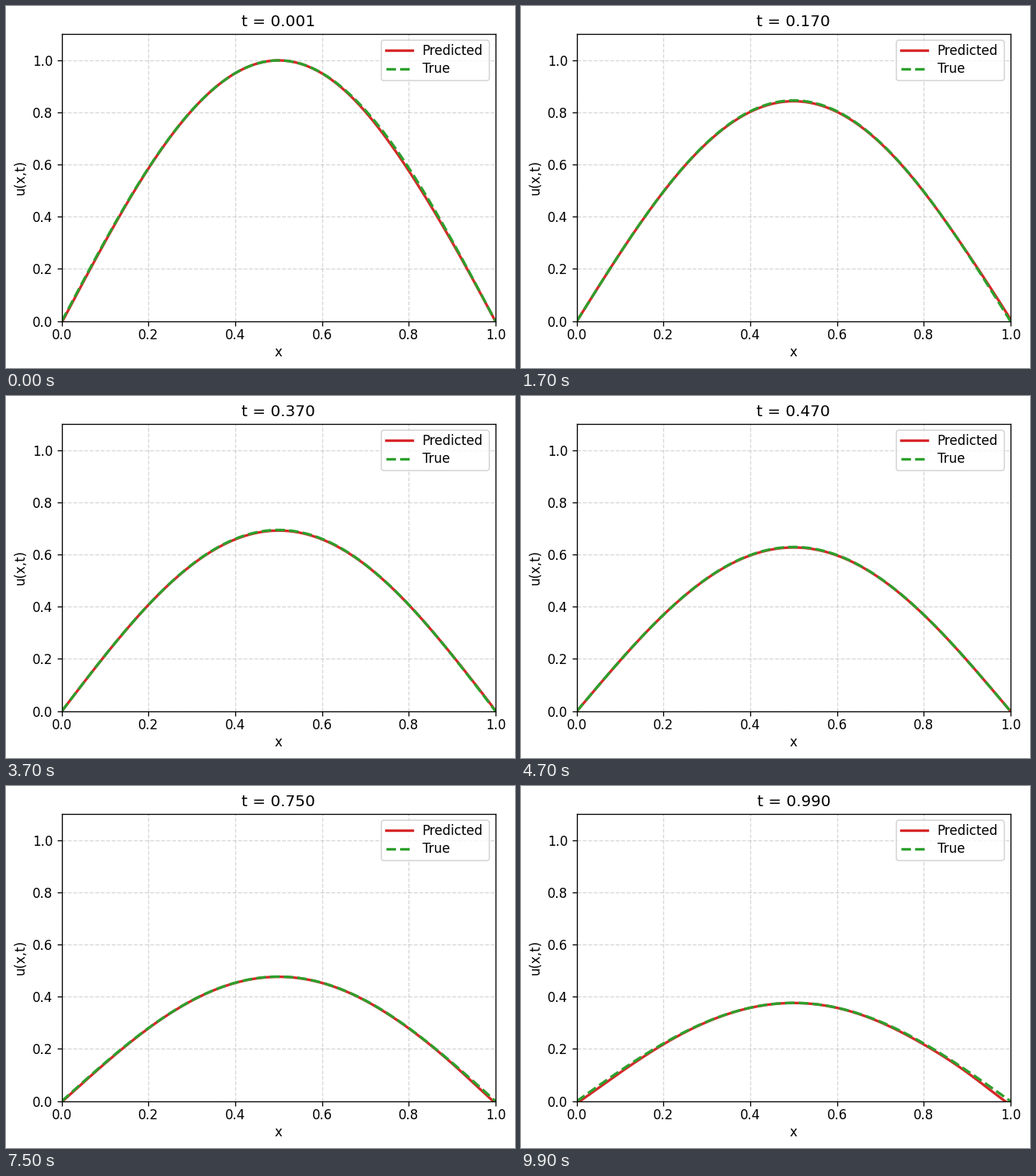
Animation, 655 px wide and 466 px high, one loop 10 s. Source, as a matplotlib script:

```python
import numpy as np
import matplotlib.pyplot as plt
from matplotlib.animation import FuncAnimation
from matplotlib.lines import Line2D
from matplotlib.patches import FancyBboxPatch
from matplotlib.transforms import IdentityTransform

W, H, DPI = 655, 466, 120
FRAMES, INTERVAL = 100, 100
LEFT, BOTTOM, AX_W, AX_H = 71.84, 60.33, 558, 369.6
EM = 10 * DPI / 72          # default font size in pixels
ALPHA = 0.1

x = np.linspace(0, 1, 200)


def true_u(t):
    return np.exp(-ALPHA * np.pi**2 * t) * np.sin(np.pi * x)


def bump(centre, width):
    return np.exp(-((x - centre) / width) ** 2)


def predicted_u(t):
    """Exact solution plus a small network error that drifts with time."""
    early, late = np.exp(-t / 0.06), t**4
    error = -(0.005 * early + 0.009 * late) * bump(0, 0.2)
    error -= 0.04 * t * np.exp(-t / 0.2) * bump(0.5, 0.22)
    error -= (0.011 * early + 0.004 * late) * bump(0.8, 0.13)
    error += (0.013 - 0.028 * t) * (1 - early) * bump(1, 0.09)
    return true_u(t) + error


fig = plt.figure(figsize=(W / DPI, H / DPI), dpi=DPI)
ax = fig.add_axes([LEFT / W, BOTTOM / H, AX_W / W, AX_H / H])
pred_line, = ax.plot(x, predicted_u(0), color="tab:red", lw=2, label="Predicted")
true_line, = ax.plot(x, true_u(0), "--", color="tab:green", lw=2, label="True")
ax.set_xticks(np.arange(6) / 5)
ax.set_xlim(0, 1)
ax.set_ylim(0, 1.1)
ax.grid(True, linestyle="--", alpha=0.5)
title = ax.set_title("t = 0.001")

# Text hangs on baselines, so its place does not depend on font line height
ax.tick_params(axis="x", pad=10.7)
plt.setp(ax.get_xticklabels(), va="baseline")
ax.set_xlabel("x", va="baseline")
ax.xaxis.set_label_coords(0.5, -45.33 / AX_H)
ax.set_ylabel("u(x,t)", va="baseline")
ax.yaxis.set_label_coords(-47.83 / AX_W, 0.5)

# Legend, laid out in pixels from the top right corner of the axes
pixels = IdentityTransform()
box_w, box_h = 139, 3.1 * EM
box_x = LEFT + AX_W - 0.5 * EM - box_w
box_y = BOTTOM + AX_H - 0.5 * EM - box_h
fig.add_artist(FancyBboxPatch(
    (box_x, box_y), box_w, box_h, transform=pixels, snap=True,
    boxstyle=f"round,pad=0,rounding_size={0.2 * EM}",
    fc="white", ec="0.8", lw=1, alpha=0.8))


def legend_row(line, baseline):
    start = box_x + 0.4 * EM
    mid = baseline + 0.35 * EM
    fig.add_artist(Line2D([start, start + 2 * EM], [mid, mid], lw=2,
                          color=line.get_color(), ls=line.get_linestyle(),
                          transform=pixels))
    fig.text(start + 2.8 * EM, baseline, line.get_label(), transform=pixels)


for row, line in enumerate((pred_line, true_line)):
    legend_row(line, box_y + (1.98 - 1.4 * row) * EM)


def update(i):
    t = max(i / FRAMES, 0.001)
    pred_line.set_ydata(predicted_u(t))
    true_line.set_ydata(true_u(t))
    title.set_text(f"t = {t:.3f}")
    return pred_line, true_line, title


anim = FuncAnimation(fig, update, frames=FRAMES, interval=INTERVAL,
                     repeat=True, repeat_delay=0)
plt.show()
```
